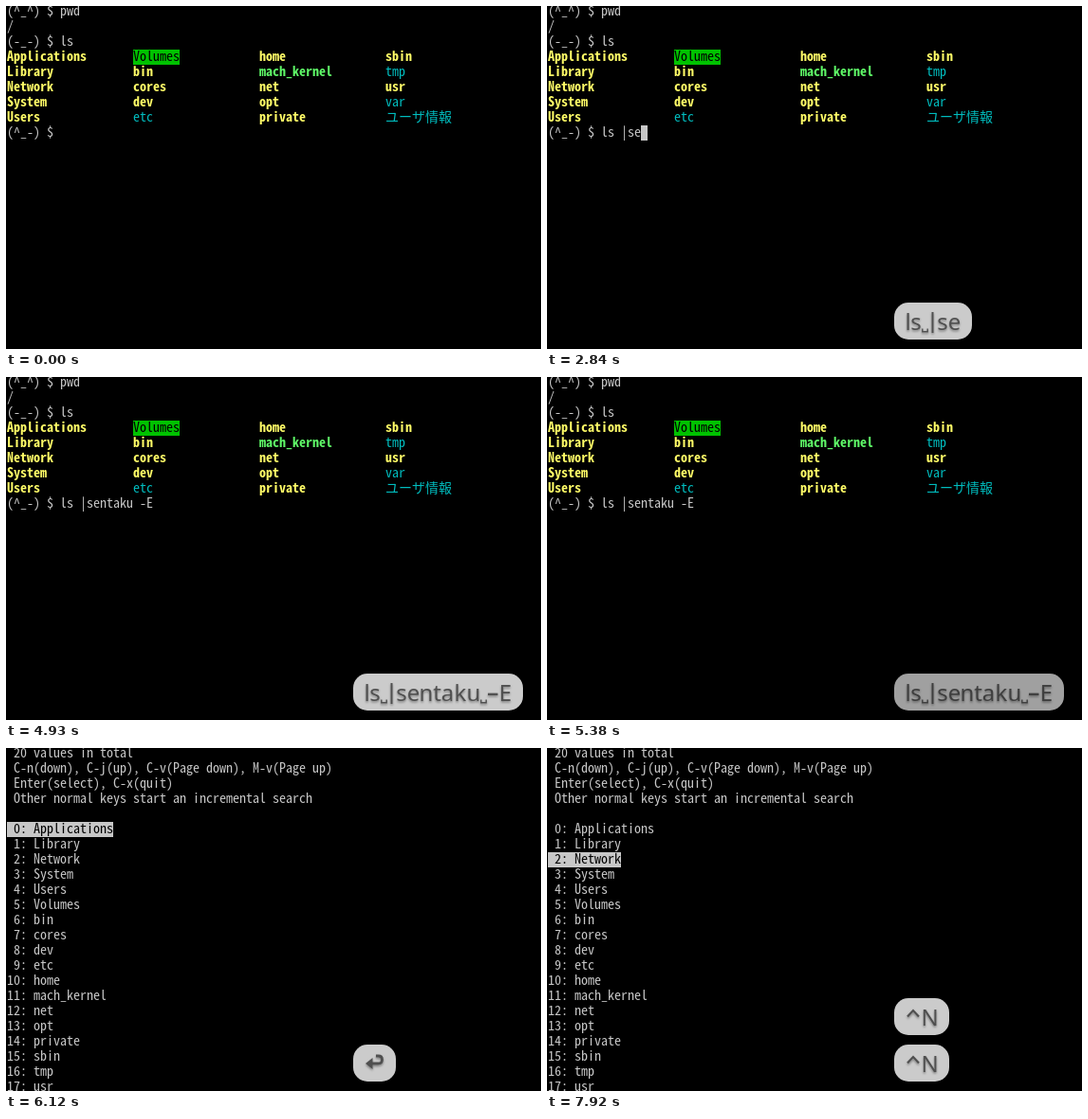
Animation, 564 px wide and 362 px high, one loop 8000 ms. Source, as an HTML page:

```html
<!DOCTYPE html>
<html lang="en">
<head>
<meta charset="utf-8">
<title>Terminal session</title>
<style>
  html, body { margin: 0; width: 100%; height: 100%; overflow: hidden; background: #000; }
  svg { display: block; }
  .term text { font: 14px "Noto Sans Mono CJK JP", "Noto Sans Mono", "DejaVu Sans Mono", monospace; white-space: pre; }
  .term .bold { font-weight: bold; }
  .keys text { font: 500 24px "Noto Sans", "Open Sans", sans-serif; text-anchor: middle; }
</style>
</head>
<body>
<svg id="stage" width="564" height="362" viewBox="0 0 564 362">
  <defs>
    <filter id="soft" x="-20%" y="-20%" width="140%" height="150%">
      <feDropShadow dx="0" dy="1.5" stdDeviation="1.2" flood-color="#000" flood-opacity="0.4"/>
    </filter>
  </defs>
  <rect width="564" height="362" fill="#000"/>
</svg>
<script>
const LOOP = 8000, CELL = 7, LINE = 16;
const FG = "#c7c7c7", YELLOW = "#fffc67", LIME = "#5ffa68", CYAN = "#00bcbe", GREEN = "#00c200";
const stage = document.getElementById("stage");

function add(parent, tag, attrs = {}, text) {
  const el = document.createElementNS("http://www.w3.org/2000/svg", tag);
  for (const k in attrs) el.setAttribute(k, attrs[k]);
  if (text !== undefined) el.textContent = text;
  parent.append(el);
  return el;
}
const show = (el, on) => el.setAttribute("visibility", on ? "visible" : "hidden");
const colX = c => 1 + c * CELL;
const rowY = r => r * LINE - 2;

// Keep latin text on the 7px grid whichever mono font is present
function gridGap() {
  const probe = add(add(stage, "g", { class: "term" }), "text", {}, "MMMMMMMMMM");
  const gap = CELL - probe.getComputedTextLength() / 10;
  probe.parentNode.remove();
  return Math.abs(gap) < 0.01 ? 0 : gap;
}
const gap = gridGap();

function put(parent, col, row, str, fill = FG, bold = false) {
  const wide = str.charCodeAt(0) > 255;
  return add(parent, "text", {
    x: colX(col), y: rowY(row) + 12, fill,
    class: bold ? "bold" : "", "letter-spacing": wide ? 0 : gap
  }, str);
}
function block(parent, col, row, len, fill = FG) {
  return add(parent, "rect", { x: colX(col), y: rowY(row), width: len * CELL, height: LINE, fill });
}

// Shell screen
const shell = add(stage, "g", { class: "term" });
const names = ("Applications Library Network System Users Volumes bin cores dev etc " +
  "home mach_kernel net opt private sbin tmp usr var ユーザ情報").split(" ");
const links = ["etc", "tmp", "var", "ユーザ情報"];

put(shell, 0, 0, "(^_^) $ pwd");
put(shell, 0, 1, "/");
put(shell, 0, 2, "(-_-) $ ls");
names.forEach((name, i) => {
  const col = Math.floor(i / 5) * 19, row = 3 + i % 5;
  if (name === "Volumes") {
    block(shell, col, row, name.length, GREEN);
    put(shell, col, row, name, "#000");
  } else if (links.includes(name)) put(shell, col, row, name, CYAN);
  else put(shell, col, row, name, name === "mach_kernel" ? LIME : YELLOW, true);
});
put(shell, 0, 8, "(^_-) $");
const command = "ls |sentaku -E";
const typed = put(shell, 8, 8, "");
const cursor = block(shell, 8, 8, 1);

// Selection screen
const menu = add(stage, "g", { class: "term" });
["20 values in total",
 "C-n(down), C-j(up), C-v(Page down), M-v(Page up)",
 "Enter(select), C-x(quit)",
 "Other normal keys start an incremental search"
].forEach((line, i) => put(menu, 1, i, line));
const bar = block(menu, 0, 5, 1);
const items = names.slice(0, 18).map((name, i) =>
  put(menu, 0, 5 + i, String(i).padStart(2) + ": " + name));

// Key bubbles
const keys = add(stage, "g", { class: "keys" });
const advance = { l: 5, s: 12, " ": 7, "|": 9, e: 13, n: 14, t: 9, a: 13, k: 14, u: 14,
  "-": 13, E: 13, "^": 17, N: 17, "\n": 21 };

function bubble(str, y, alpha) {
  const g = add(keys, "g", { transform: `translate(366 ${y})`, opacity: alpha });
  const box = add(g, "rect", { height: 39, rx: 15, fill: "#cbcbcb" });
  const ink = add(g, "g", { fill: "#505050", filter: "url(#soft)" });
  const line = (d, w) => add(ink, "path", { d, fill: "none", stroke: "#505050", "stroke-width": w });
  let x = 12;
  for (const ch of str) {
    const w = advance[ch], mid = x + w / 2;
    if (ch === " ") line(`M${x + 0.8} 27.5v3.2h5.4v-3.2`, 1.4);
    else if (ch === "-") line(`M${x + 1} 21.8h10.5`, 2.3);
    else if (ch === "|") line(`M${mid} 10v22`, 2);
    else if (ch === "^") line(`M${x + 2} 19.5l6-6.5 6 6.5`, 2.2);
    else if (ch === "\n") {
      line(`M${x + 12} 12h2.5q4 0 4 4t-4 4h-9`, 2.8);
      add(ink, "path", { d: `M${x + 1} 20l7.5-6v12z` });
    } else add(ink, "text", { x: mid, y: 28.5 }, ch);
    x += w;
  }
  box.setAttribute("width", x + 12);
}

// [time, characters on the line, characters in the bubble]
const strokes = [[1650, 0, 1], [1800, 2, 2], [1950, 3, 3], [2400, 4, 4], [2700, 5, 5], [2840, 6, 6],
  [2990, 7, 9], [3140, 11, 11], [3290, 12, 12], [3430, 13, 13], [3880, 14, 14]];
const LOW = 313, HIGH = 264;
const fade = (t, start) => t < start ? 1 : t < start + 150 ? 0.79 : t < start + 300 ? 0.42 : 0;

function bubblesAt(t, shown) {
  const list = [];
  if (t < 5980) {
    if (shown && fade(t, 5380)) list.push([command.slice(0, shown), LOW, fade(t, 5380)]);
    return list;
  }
  const a = fade(t, 7470);
  if (a) list.push(["\n", t < 7620 ? LOW : HIGH, a]);
  if (t >= 7620) list.push(["^N", LOW, 1]);
  if (t >= 7920) list.push(["^N", HIGH, 1]);
  return list;
}

let last = "";
function draw(t) {
  const [, count, shown] = strokes.filter(s => s[0] <= t).pop() || [0, 0, 0];
  const pick = t < 7770 ? 0 : t < 7920 ? 1 : 2;
  const blink = t >= 1050 && t < 4930 || t >= 5830;
  const list = bubblesAt(t, shown);
  const state = JSON.stringify([count, pick, blink, t < 5980, t < 6120, list]);
  if (state === last) return;
  last = state;

  shell.style.display = t < 5980 ? "" : "none";
  menu.style.display = t >= 6120 ? "" : "none";
  typed.textContent = command.slice(0, count);
  cursor.setAttribute("x", colX(8 + count));
  show(cursor, blink);
  bar.setAttribute("y", rowY(5 + pick));
  bar.setAttribute("width", items[pick].textContent.length * CELL);
  items.forEach((el, i) => el.setAttribute("fill", i === pick ? "#000" : FG));
  keys.replaceChildren();
  list.forEach(b => bubble(...b));
}

const start = performance.now();
function tick() {
  draw((performance.now() - start) % LOOP);
  requestAnimationFrame(tick);
}
tick();
</script>
</body>
</html>
```
